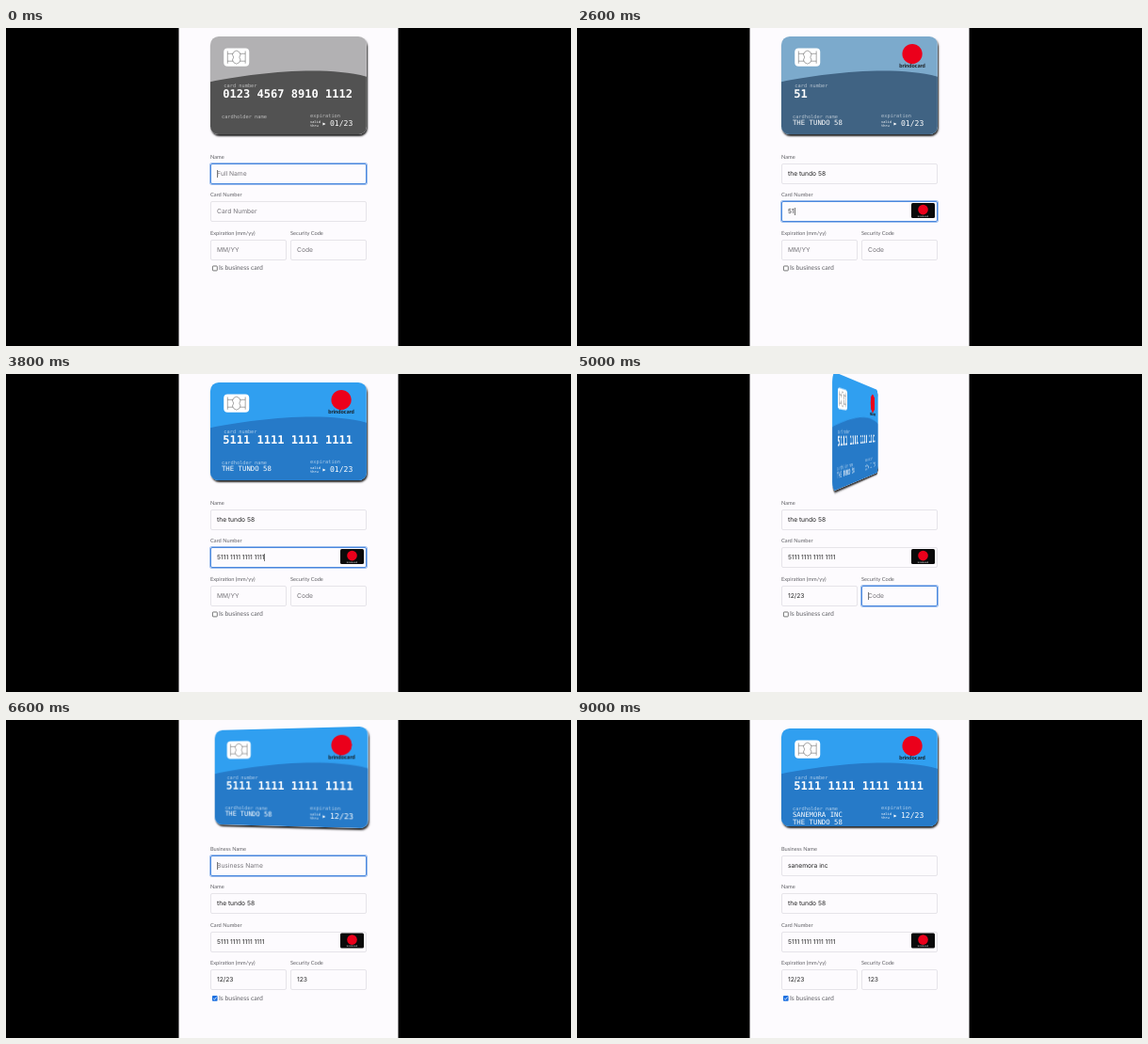
An HTML page that plays this animation: 600 by 338 pixels, repeating every 9.2 s.

```html
<!DOCTYPE html>
<html lang="en">
<head>
<meta charset="utf-8">
<title>Card form</title>
<style>
html, body { margin: 0; width: 100%; height: 100%; overflow: hidden; background: #000; }
#stage { position: relative; width: 600px; height: 338px; overflow: hidden; text-rendering: geometricPrecision;
  background: linear-gradient(90deg, #000 183px, #fdfbfe 184px 416px, #000 417px); }
#scene { position: absolute; left: 217px; top: 8.7px; width: 165.75px; height: 104.1px; perspective: 420px; }
#card, .face { position: absolute; width: 100%; height: 100%; border-radius: 8.8px; }
#card { transform-style: preserve-3d; box-shadow: 1px 2px 2px rgba(0,0,0,.85); }
.face { backface-visibility: hidden; }
.face svg { display: block; width: 100%; height: 100%; border-radius: 8.8px; }
.face text { font-family: "DejaVu Sans Mono", monospace; fill: #fff; white-space: pre; }
.face .hint { font-size: 24px; opacity: .6; }
.front { transform: translateZ(.1px); }
.back { transform: rotateY(180deg) translateZ(.1px); }
#form > * { position: absolute; box-sizing: border-box; white-space: pre; }
.label { font: 5.7px/8px Lato, sans-serif; color: #606065; }
.field { height: 22px; padding-left: 6px; border: 1px solid #e6e4e9; border-radius: 2px;
  font: 6.7px/21px Inter, sans-serif; font-kerning: none; color: #222; }
.empty { color: #77757a; }
.focus { border-color: #4a88de; box-shadow: 0 0 0 1px rgba(74,136,222,.55); }
.field i { display: inline-block; width: 1px; height: 8px; margin-right: -1px; background: #777; vertical-align: -1.5px; }
.list { left: 217px; top: 166px; width: 166px; height: 8px; padding-left: 2.5px; background: #17141a;
  color: #fff; font: 4.7px/8px Inter, sans-serif; }
</style>
</head>
<body>
<div id="stage">
  <div id="scene"><div id="card"></div></div>
  <div id="form"></div>
</div>
<script>
const LOOP = 9200, STEP = 200;
const NAME = 'the tundo 58', BUSINESS = 'sanemora inc', BRAND = 'brindocard';
const $ = id => document.getElementById(id);
const clamp = p => Math.max(0, Math.min(1, p));
const typed = (text, t, from, to) => text.slice(0, Math.round(text.length * clamp((t - from) / (to - from))));
const mix = (a, b, p) => `rgb(${a.map((v, i) => Math.round(v + (b[i] - v) * p))})`;
const backOut = p => 1 + 2.7 * (p - 1) ** 3 + 1.7 * (p - 1) ** 2;
const flip = (t, start) => t < start ? 0 : backOut(clamp((t - start) / 400));

function stateAt(t) {
  const digits = t < 2600 ? '' : '5111111111111111'.slice(0, Math.round(2 + 14 * clamp((t - 2600) / 1200)));
  const focusTimes = [[0, 'name'], [2200, 'number'], [4000, 'expiry'], [5000, 'code'],
    [6000, ''], [6400, 'business'], [8800, '']];
  return {
    name: typed(NAME, t, 0, 1400),
    number: digits.replace(/(.{4})(?=.)/g, '$1 '),
    expiry: typed('12/23', t, 4000, 4800),
    code: typed('123', t, 5000, 5500),
    business: typed(BUSINESS, t, 6700, 8400),
    focus: focusTimes.filter(f => f[0] <= t).pop()[1],
    isBusiness: t >= 6000,
    branded: t >= 2600,
    caret: t < 1600 || t > 2000,
    list: t >= 200 && t < 2200,
    tint: clamp((t - 2400) / 480),
    angle: 180 * (flip(t, 4960) - flip(t, 6300))
  };
}

const text = (x, y, size, str, extra = '') => `<text x="${x}" y="${y}" font-size="${size}" ${extra}>${str}</text>`;
const hint = (x, y, str) => `<text x="${x}" y="${y}" class="hint">${str}</text>`;
const rect = (x, y, w, h, fill) => `<rect x="${x}" y="${y}" width="${w}" height="${h}" fill="${fill}"/>`;
const face = (side, art) => `<div class="face ${side}"><svg viewBox="0 0 750 471">${art}</svg></div>`;

const chip = `<rect x="64.4" y="56.4" width="122.2" height="87.2" rx="18.5" fill="#fff"/>
  <g fill="none" stroke="#4c4c4c" stroke-width="2.2">
  <path d="M82.8 70v60M168.1 70v60M82.8 82.8h26M82.8 118.6h26M142 82.8h26M142 118.6h26"/>
  <path d="M111.7 100a18.5 18.5 0 1 1 27.6 0a18.5 18.5 0 1 1 -27.6 0z"/></g>`;
const brand = `<circle cx="629" cy="84" r="48" fill="#eb001b"/>` +
  text(629, 149, 26, BRAND, 'text-anchor="middle" style="font-family:Lato,sans-serif;font-weight:bold;fill:#151515"');

function drawCard(s) {
  const light = mix([178, 177, 179], [48, 159, 240], s.tint);
  const dark = mix([82, 82, 82], [38, 122, 200], s.tint);
  const lines = [s.business, s.name].filter(Boolean);
  const front = rect(0, 0, 750, 471, light) +
    `<path fill="${dark}" d="M750 471V193.2c-217.6-57.5-556.4-13.5-750 24.9V471z"/>` +
    chip + (s.branded ? brand : '') +
    hint(65, 244, 'card number') +
    text(60, 295, 54.5, s.number || '0123 4567 8910 1112', 'font-weight="bold"') +
    hint(54, 392, 'cardholder name') +
    lines.map((line, i) => text(54, 427 + 33.8 * i, 33.2, line.toUpperCase())).join('') +
    hint(479.8, 391, 'expiration') +
    text(479.4, 417, 16.5, 'valid') + text(479.4, 435.7, 16.5, 'thru') +
    '<path d="M554.5 421l-14.1-6.8v13.7z" fill="#fff"/>' +
    text(574.4, 432, 36.5, s.expiry || '01/23');
  const back = rect(0, 0, 750, 471, dark) + rect(0, 61.6, 750, 78, '#111') +
    rect(42.9, 184.6, 664, 64.5, '#f2f2f2') +
    rect(42.9, 198.6, 664, 10.5, '#d8d2db') + rect(42.9, 224.5, 664, 10.5, '#d8d2db') +
    rect(600, 184.6, 107, 64.5, '#c4c4c4') +
    text(59.5, 228.6, 40, s.name, 'style="font-family:\'Liberation Serif\',serif;font-style:italic;fill:#222"') +
    text(622, 227.3, 27.6, s.code || '985', 'style="fill:#222"') +
    hint(518, 279, 'security code') +
    rect(58.1, 377.6, 375.5, 13.5, '#f5f5f5') + rect(58.1, 404.6, 421.7, 13.5, '#f5f5f5');
  $('card').innerHTML = face('front', front) + face('back', back);
  $('card').style.transform = `rotateY(${s.angle}deg)`;
}

const at = (cls, x, y, content, style = '') =>
  `<div class="${cls}" style="left:${x}px;top:${y}px;${style}">${content}</div>`;
const svg = (x, y, art) =>
  `<svg width="600" height="338" style="left:0;top:0"><g transform="translate(${x} ${y})">${art}</g></svg>`;

const checkedBox = `<rect width="5.6" height="5.6" rx=".8" fill="#1a6fe0"/>
  <path d="M1.2 2.9l1.2 1.2 2.1-2.7" fill="none" stroke="#fff" stroke-width=".8"/>`;
const emptyBox = '<rect x=".4" y=".4" width="4.9" height="4.9" rx=".7" fill="#fff" stroke="#555" stroke-width=".8"/>';
const badge = `<rect width="25" height="16" rx="1.5" fill="#0a0a0a"/><circle cx="12.5" cy="7" r="5.3" fill="#eb001b"/>
  <text x="12.5" y="14.6" font-size="2.4" fill="#fff" text-anchor="middle" font-family="Lato,sans-serif">${BRAND}</text>`;

function drawForm(s, t) {
  const field = (key, label, placeholder, row, x = 217, width = 166) => {
    const y = Math.floor(144 + 40.5 * row), focused = s.focus === key;
    const caret = focused && s.caret ? '<i></i>' : '';
    return at('label', x, 133.6 + 40.5 * row, label) +
      at(`field ${s[key] ? '' : 'empty'} ${focused ? 'focus' : ''}`, x, y,
        s[key] ? s[key] + caret : caret + placeholder, `width:${width}px`);
  };
  const shift = s.isBusiness ? 1 : 0, dy = 40.5 * shift;

  $('form').innerHTML =
    (s.isBusiness ? field('business', 'Business Name', 'Business Name', 0) : '') +
    field('name', 'Name', 'Full Name', shift) +
    field('number', 'Card Number', 'Card Number', 1 + shift) +
    field('expiry', 'Expiration (mm/yy)', 'MM/YY', 2 + shift, 217, 81) +
    field('code', 'Security Code', 'Code', 2 + shift, 302, 81) +
    svg(219, 252.6 + dy, s.isBusiness ? checkedBox : emptyBox) +
    at('label', 226, 251 + dy, 'Is business card', 'font-size:6.85px;line-height:9px') +
    (s.branded ? svg(355, 186.1 + dy, badge) : '') +
    (s.list ? `<div class="list">${NAME.replace(/ /g, '')}</div>` : '') +
    pointer(t);
}

function pointer(t) {
  const stops = [[1600, 387, 172], [1800, 387.5, 179], [2000, 380, 192], [2200],
    [5600, 258, 250], [5800, 231, 255], [6000, 222, 255], [6200, 230, 220], [6400, 248, 156], [6600]];
  const [, x, y] = stops.filter(p => p[0] <= t).pop() || [];
  return x ? svg(x, y,
    '<path d="M0 0v5.8l1.4-1.2 1 2.4 1-.4-1-2.3h1.8z" fill="#000" stroke="#fff" stroke-width=".4"/>') : '';
}

const start = performance.now();
let shown = -1;
function frame() {
  const t = Math.floor((performance.now() - start) % LOOP / STEP) * STEP;
  if (t !== shown) {
    const state = stateAt(t);
    drawCard(state);
    drawForm(state, t);
    shown = t;
  }
  requestAnimationFrame(frame);
}
frame();
</script>
</body>
</html>
```
